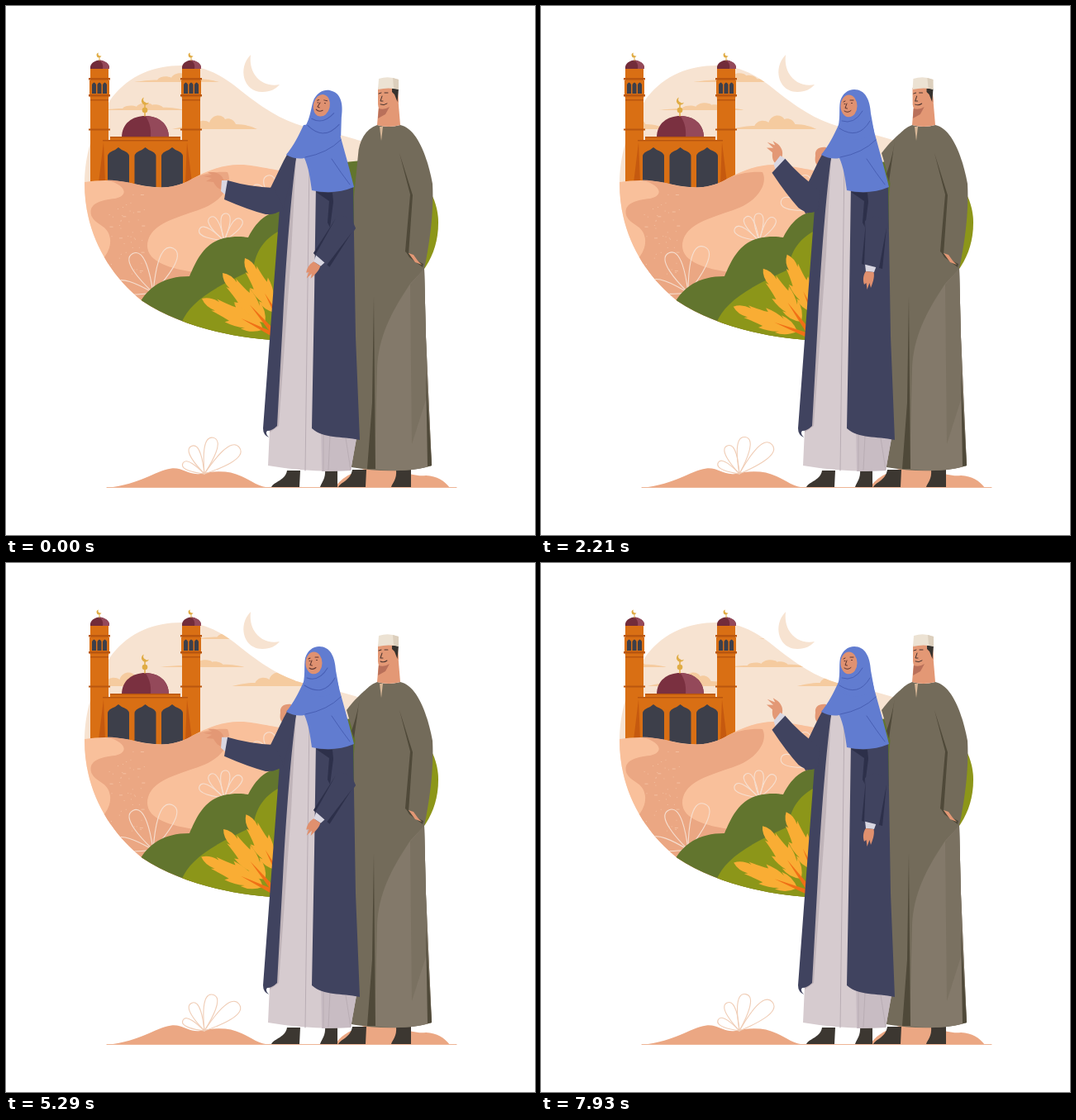
Write an HTML page that moves like this. It is 640x640 px and loops after 8000 ms.

```html
<!DOCTYPE html>
<html lang="en">
<head>
<meta charset="utf-8">
<title>Evening walk</title>
<style>
  html, body { margin: 0; width: 100%; height: 100%; overflow: hidden; background: #fff; }
  svg { display: block; width: 100%; height: 100%; }
  .line { fill: none; stroke-linecap: round; stroke-linejoin: round; }
</style>
</head>
<body>
<svg viewBox="0 0 640 640">
  <defs>
    <clipPath id="blob"><path d="M95 215C95 185 103 148 128 111C150 83 180 72 212 72C245 72 267 88 290 107C320 130 340 141 372 149C400 155 410 157 425 162C480 178 523 215 523 262C523 300 505 325 480 345C440 385 390 405 340 405C277 403 212 388 165 357C120 321 95 270 95 215Z"/></clipPath>
    <path id="cloud" d="M0 17C9 15 17 13 28 13C31 6 40 5 45 9C49-2 61-1 64 5C69 3 75 6 77 11C88 11 97 14 103 17Z"/>
    <g id="minaret">
      <path fill="#d96f14" d="M102 76H124V90H125V106L124 112V215H102V112L101 106V90H102Z"/>
      <path fill="#b9560f" d="M100 87H126V89.500H100ZM100 107H126V109.500H100ZM102 113H124V114.500H102ZM100 148.500H126V150.500H100Z"/>
      <path fill="#722c3a" d="M102 76C101 69 108 66 113 65.500C118 66 126 69 125 76Z"/>
      <path fill="#94495a" d="M113 65.500C118 66 126 69 125 76H117C118 71 116 68 113 65.500Z"/>
      <path class="line" stroke="#e0ac45" d="M113 66V61"/>
      <path fill="#e0ac45" d="M112 56.500A3 3 0 1 0 115.500 60A2.500 2.500 0 0 1 112 56.500Z"/>
      <g id="slits" fill="#3d3f4a"></g>
    </g>
  </defs>

  <g clip-path="url(#blob)">
    <rect x="90" y="65" width="440" height="345" fill="#f7e3d1"/>
    <g id="clouds" fill="#f5cb9f"></g>
  </g>
  <path fill="#f7e3d1" d="M296 59C280 75 287 104 310 104C320 104 327 100 331 95C312 99 293 85 296 59Z"/>

  <use href="#minaret"/>
  <use href="#minaret" x="111"/>
  <path fill="#7a3040" d="M140 159C140 142 153 133 168.500 133C184 133 197 142 197 159Z"/>
  <path fill="#94495a" d="M168.500 133C184 133 197 142 197 159H175C176 147 173 139 168.500 133Z"/>
  <path class="line" stroke="#e0ac45" stroke-width="1.500" d="M168 133V117"/>
  <circle cx="168" cy="126" r="3.300" fill="#e0ac45"/>
  <path fill="#e0ac45" d="M167 110.500A4.700 4.700 0 1 0 173 116.500A4.300 4.300 0 0 1 167 110.500Z"/>
  <path fill="#d96f14" d="M126 158H211V163H220V220H117V163H126Z"/>
  <path fill="#b9560f" d="M126 158H211V159.500H126ZM117 162H220V163.500H117Z"/>
  <path fill="#c5590f" d="M112 214L118 165L120 214ZM225 214L219 165L217 214Z"/>
  <g id="arches" fill="#3d3f4a"></g>

  <g clip-path="url(#blob)">
    <path fill="#f9c09b" d="M90 214C110 210 130 210 150 214C180 221 200 222 220 212C245 198 265 191 285 192C310 193 330 202 440 215V410H90Z"/>
    <path fill="#eba783" d="M122 210.500C140 211 152 214.500 165 217.500C190 222 206 219 222 211C235 203 252 200 268 201C275 215 262 235 240 244C210 256 172 262 171 290C171 310 200 318 228 322V400H100L119 304C122 300 127 292 126 282C124 264 108 266 103 253C100 240 112 235 132 233C148 230 147 217 122 210.500Z"/>
    <g id="specks" fill="#f6c6a8"></g>
    <g id="dune-flowers" class="line" stroke="#f6dfd0" stroke-width="1.100"></g>
    <path fill="#62752e" d="M160 362C172 340 190 327 222 327C231 306 240 287 263 281C277 278 286 279 293 280C302 262 314 250 332 248L400 190L430 187V410H160Z"/>
    <path fill="#8c9619" d="M212 384C222 358 252 340 299 319C302 296 313 280 335 270H430V190H530V410H212Z"/>
  </g>
  <g id="leaves"></g>

  <path fill="#eba783" d="M122 583C165 578 178 563 200 559.500C214 558 221 568 235 566C255 562 270 562 285 569C298 575 306 582 320 583ZM398 583C405 570 425 560 445 558C475 557 487 570 508 568C522 569 530 574 537 583Z"/>
  <path class="line" stroke="#eeb596" d="M122 582.500H545"/>
  <g id="ground-flower" class="line" stroke="#f0cdb6" stroke-width="1.100"></g>

  <g id="man">
    <path id="fingers" fill="#e39875" d="M345 171C336 170 331 174 332 181C331 188 332 192 336 193H345Z"/>
    <g id="sleeve">
      <path fill="#736b5a" d="M441 149C430 157 420 167 412 178L417 195L425 222H445Z"/>
      <path fill="#4f4939" d="M428 163C426 178 422 192 418 203L421 212Z"/>
    </g>
    <path fill="#3c3731" d="M419 561H436L435 582H402C405 576 417 574 419 561ZM472 561H490V582H466C468 576 473 573 472 561Z"/>
    <path fill="#736b5a" d="M449 144Q463 148 477 144C496 148 509 178 516 215C518 250 512 290 506 318L508 400L515 556C490 564 450 564 418 558L421 400V230L426 180C427 163 435 149 449 144Z"/>
    <path fill="#83796a" d="M489 336C465 372 451 400 449 438L446 560C470 564 496 562 515 556L508 400L506 318Z"/>
    <path fill="#7a7161" d="M489 337L506 318L508 400L510 470L491 530Z"/>
    <path fill="#4f4939" d="M445 352L443 480L437 560H447L446 470ZM476 178L489 228L483 297L487 301L492 229ZM508 440L510 557L515 556ZM483 296L488 304L504 316L505 312L497 308Z"/>
    <path fill="#e39875" d="M487 299L493 301L498 308L503 313L495 310Z"/>
    <path fill="#d8b797" d="M452 146H456L454 163Z"/>
    <path fill="#e39875" d="M451 120L474 108L477 144Q463 148 449 144Z"/>
    <g id="man-head">
      <path fill="#e39875" d="M450 99H474L475 116L470 125L458 126Q450 126 450 119Z"/>
      <path fill="#b9705a" d="M451 124Q458 126 464 122L459 131L450 136Z"/>
      <path fill="#37332f" d="M467 100H475L473.500 116L470 107L467 104Z"/>
      <path fill="#ece2d3" d="M451 88Q463 84 475 89V101Q463 98 450 101Z"/>
      <path fill="#dccfbd" d="M468 87L475 89V101L469 99Z"/>
      <path class="line" stroke="#4a3530" d="M451 106L454 105M458 105L462 105M455 109L453 115L456 115M453 119Q457 121 461 118"/>
    </g>
  </g>

  <g id="woman">
    <path fill="#3c3731" d="M340 562H356L355 582H321C325 575 338 574 340 562ZM386 560H401V582H380C382 576 387 572 386 560Z"/>
    <path fill="#d6cbcf" d="M347 181H377L374 400L371 512L424 523L417 562Q370 565 317 556L319 512L326 508Z"/>
    <path fill="#c0b4b9" d="M351 183L345 300L330 508L319 516L334 250Z"/>
    <path fill="#c8bcc3" d="M381 516L424 523L417 562L382 563Z"/>
    <path class="line" stroke="#b9adb4" d="M367 190L362 562M384 519V562M392 520L390 561M411 523L417 561"/>
    <path fill="#40435f" d="M341 178L351 183C345 230 339 300 335 380L328 508Q322 514 316 514Q313 517 318 522Q311 519 311 511L320 390L331 245Z"/>
    <path fill="#40435f" d="M375 215H420L423 400L428 525C405 520 385 524 370 511L373 350Z"/>
    <path fill="#40435f" d="M341 178L351 184L335 248L320 251L312 236L322 216C328 204 334 190 341 178Z"/>
    <path fill="#2d304a" d="M375 225L395 226L396 237L392 268L389 262L391 236Z"/>
    <g id="right-arm">
      <path fill="#d9d7e2" d="M392 312L406 314L403 322L393 321Z"/>
      <path fill="#e0906e" d="M393 321L402.500 322C404 328 401 336 399 341L397.500 335L394.500 343L393.500 335L391 337C389 331 390 325 393 321Z"/>
      <path fill="#40435f" d="M392 260Q406 248 420 262L413 318L389 312Z"/>
      <path fill="#2d304a" d="M393 262L388 312L391 313ZM418 268L413 318L409 317Z"/>
    </g>
    <g id="left-arm">
      <path fill="#e39875" d="M264 212C262 205 257 202 251 201L244 201L249 204L239 206L249 208L242 212L251 213C254 219 258 222 262 222Z"/>
      <path fill="#d9d7e2" d="M261 211L270 211L267 230L260 224Z"/>
      <path fill="#40435f" d="M324 220Q295 219 268 211L264 234Q294 247 314 252Q331 253 335 242Z"/>
    </g>
    <path fill="#617cd0" d="M339 180C348 169 354 157 360 144L400 140C405 160 414 190 421 219Q397 229 370 223C368 208 366 195 361 184Q350 186 339 180Z"/>
    <path class="line" stroke="#485fb4" d="M362 183Q389 178 405 162M394 185Q406 203 416 216"/>
    <g id="woman-head">
      <path fill="#617cd0" d="M379 101C392 101 398 113 399 130L403 152C392 165 368 165 358 151C363 138 360 125 362 115C365 106 371 101 379 101Z"/>
      <ellipse cx="372.500" cy="121" rx="10" ry="13.500" fill="#df9171"/>
      <path fill="#617cd0" d="M362 132Q374 139 383 128L385 140L364 141Z"/>
      <path class="line" stroke="#485fb4" d="M361 148Q384 163 398 139M364 139Q379 144 389 127"/>
      <path class="line" stroke="#5c3530" d="M366 116L368 115M374 114L378 114M367 118.500H368M375.500 117.500H376.500M370 118L368 123.500L370.500 124M367 127Q371 130 375 126.500"/>
    </g>
  </g>
</svg>
<script>
const LOOP = 8000, STEP = LOOP / 112, SWAY = 6000, DRIFT = .0137;
const $ = id => document.getElementById(id);
const swaying = [];

function add(parent, tag, attrs = {}) {
  const el = document.createElementNS('http://www.w3.org/2000/svg', tag);
  for (const k in attrs) el.setAttribute(k, attrs[k]);
  return parent.appendChild(el);
}

function cloud(x, y, height) {
  return { x, y, height, el: add($('clouds'), 'use', { href: '#cloud' }) };
}
const clouds = [cloud(201, 132, 1), cloud(20, 132, 1), cloud(113, 117, .53), cloud(-60, 117, .53), cloud(155, 81, .65)];

for (let i = 0; i < 3; i++) {
  const x = 123 + 32.5 * i, s = 104 + 6.5 * i;
  add($('arches'), 'path', { d: `M${x} 222V182q0 -5 9 -8l4 -3l4 3q9 3 9 8V222Z` });
  add($('slits'), 'path', { d: `M${s} 106V95q2.500 -5 5 0V106Z` });
}

let seed = 7;
const random = () => (seed = seed * 16807 % 2147483647) / 2147483647;
for (let i = 0; i < 50; i++)
  add($('specks'), 'rect', { x: 122 + 45 * random(), y: 222 + 110 * random(), width: i % 6 ? 1 : 4, height: .8 });

// A fan of loops from angle `a` to `b`, lengths going evenly from `first` to `last`.
function flower(parent, x, y, count, a, b, first, last) {
  for (let i = 0; i < count; i++) {
    const u = i / (count - 1), angle = a + (b - a) * u, len = first + (last - first) * u, w = len * .24;
    const d = `M0 0C${-w * .5} ${-len * .35} ${-w * 1.3} ${-len} 0 ${-len}C${w * 1.3} ${-len} ${w * .5} ${-len * .35} 0 0`;
    swaying.push({ el: add(parent, 'path', { d }), x, y, angle, swing: angle > 0 ? -6 : 2 });
  }
}
flower($('dune-flowers'), 178, 347, 3, 24, -79, 59, 48);
flower($('dune-flowers'), 264, 284, 4, 38, -65, 33, 33);
flower($('dune-flowers'), 330, 247, 3, -18, -76, 44, 41);
flower($('ground-flower'), 240, 566, 4, 53, -64, 53, 29);

// A feathery leaf whose barbs point to the tip, on a bare stem.
function leaf(bx, by, tx, ty, swing) {
  const len = Math.hypot(tx - bx, ty - by), lobes = 4, bare = len * .22, d = (len - bare) / lobes;
  const side = s => {
    let path = `M${bare} 0`;
    for (let i = 1; i < lobes; i++) {
      const x = bare + d * i, r = s * 13 * Math.sin(Math.PI * (i / lobes) ** .8);
      path += `Q${x - d * .5} ${r} ${x + d * .2} ${r}L${x} ${r * .72}`;
    }
    return path + `Q${len - d * .4} ${s * 7} ${len} 0Z`;
  };
  const el = add($('leaves'), 'g');
  add(el, 'path', { fill: '#f9ad34', d: side(1) + side(-1) });
  add(el, 'path', { fill: '#f07016', d: `M0 -3.500L${len * .5} 0L0 3.500Z` });
  swaying.push({ el, x: bx, y: by, angle: Math.atan2(ty - by, tx - bx) * 180 / Math.PI, swing });
}
leaf(337, 390, 289, 305, 7);
leaf(328, 400, 262, 323, 6);
leaf(332, 402, 237, 354, -7);

// 0 before `from`, 1 after `to`, eased in between.
function ramp(t, from, to) {
  const u = Math.min(1, Math.max(0, (t - from) / (to - from)));
  return u * u * (3 - 2 * u);
}
const raised = (t, first, second) => ramp(t, 0, first) - ramp(t, 3850, 4950) + ramp(t, 5250, second);

const turn = (id, angle, x, y) => $(id).setAttribute('transform', `rotate(${angle} ${x} ${y})`);

function draw(t) {
  for (const c of clouds)
    c.el.setAttribute('transform', `translate(${c.x + t * DRIFT} ${c.y}) scale(1 ${c.height})`);

  const sway = (1 - Math.cos(2 * Math.PI * t / SWAY)) / 2;
  for (const s of swaying)
    s.el.setAttribute('transform', `translate(${s.x} ${s.y}) rotate(${s.angle + s.swing * sway})`);

  const nod = ramp(t, 0, 1500) - ramp(t, 1500, 2300) + ramp(t, 5250, 6140) - ramp(t, 6700, 7500);
  const glance = ramp(t, 3600, 4300) - ramp(t, 4500, 5290);
  turn('left-arm', 33 * raised(t, 1900, 6140), 326, 244);
  turn('right-arm', 27 * (1 - raised(t, 1300, 6500)), 407, 272);
  turn('woman-head', 12 * (1 - ramp(t, 0, 1500)) - 4.5 * glance, 380, 165);
  turn('man-head', -5.5 * nod, 462, 150);

  const hidden = 16 * (1 - ramp(t, 950, 1750));
  for (const id of ['fingers', 'sleeve']) $(id).setAttribute('transform', `translate(${hidden} 0)`);
}

const start = performance.now();
function tick() {
  const t = (performance.now() - start) % LOOP;
  draw(Math.floor(t / STEP) * STEP);
  requestAnimationFrame(tick);
}
tick();
</script>
</body>
</html>
```
